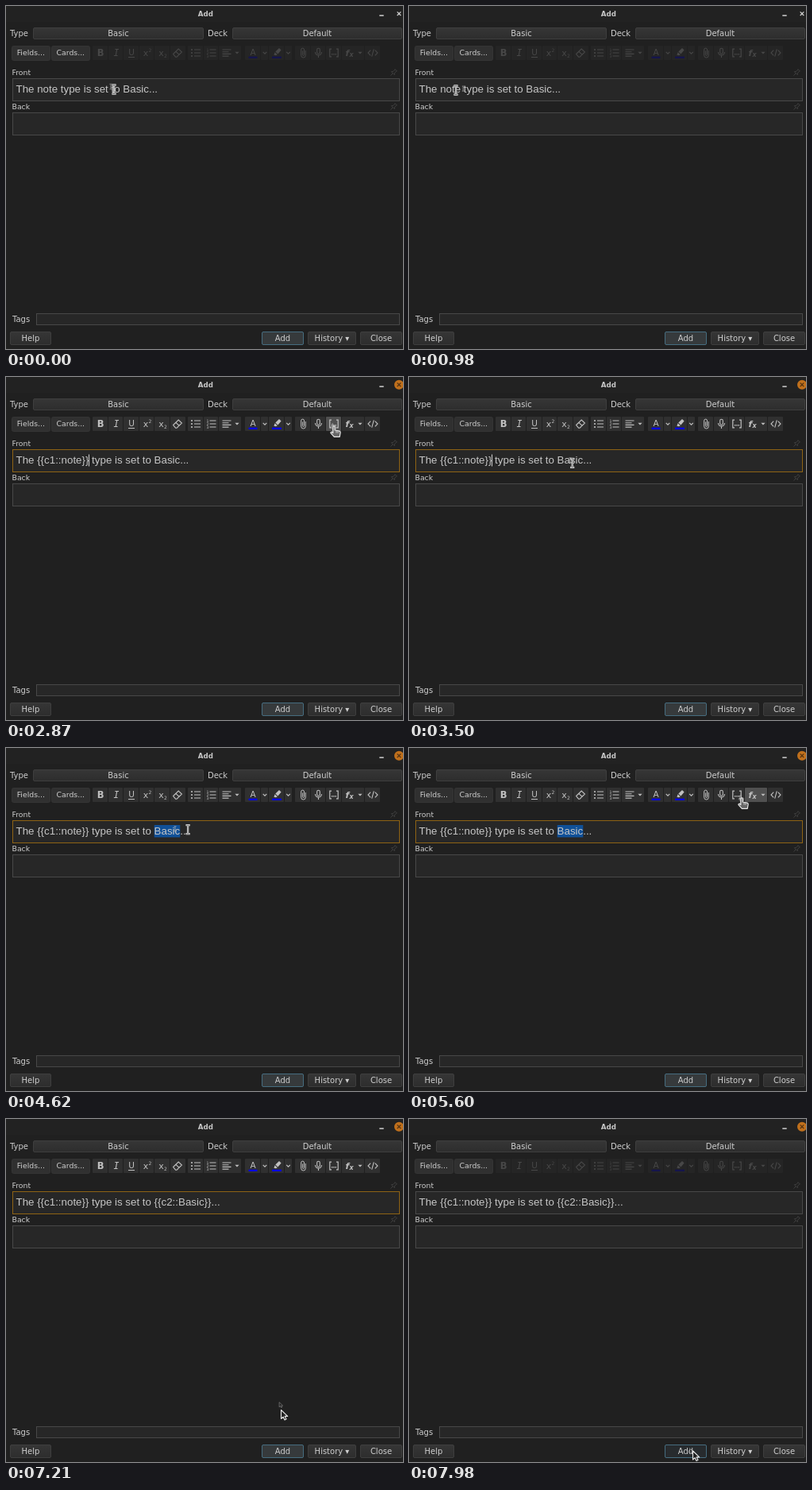
Animation, 500 px wide and 432 px high, one loop 8000 ms. Source, as an HTML page:

```html
<!DOCTYPE html>
<html lang="en">
<head>
<meta charset="utf-8">
<title>Add</title>
<style>
html, body { margin: 0; width: 100%; height: 100%; overflow: hidden; background: #202020; }
svg { display: block; width: 500px; height: 432px; }
text { font-family: "DejaVu Sans", sans-serif; font-size: 10px; fill: #cecece; white-space: pre; }
.mid { text-anchor: middle; }
.title { font-weight: bold; font-size: 8.67px; fill: #c9c9c9; }
.small { font-size: 9.33px; }
.field { font-family: "Liberation Sans", Arial, sans-serif; font-size: 13.333px; fill: #c6c6c6; }
.box { fill: #272727; stroke: #484848; }
.btn { fill: url(#face); stroke: #3e3e3e; }
.tool { fill: #303030; stroke: #353535; }
#add { fill: #363a3c; stroke: #466d80; }
.icons { color: #474747; }
.icons.on { color: #c0c0c0; }
.icons text { fill: currentColor; }
.line { fill: none; stroke: currentColor; stroke-width: 1.2; }
.solid { fill: currentColor; }
.ink { fill: #15154c; }
.on .ink { fill: #0808e0; }
.face { fill: #252525; }
.on .face { fill: #303030; }
.on .face.hover { fill: #505050; }
.pin { fill: none; stroke: #414141; stroke-width: .9; }
</style>
</head>
<body>
<svg id="stage" viewBox="0 0 500 432" xmlns="http://www.w3.org/2000/svg"></svg>
<script>
const LOOP = 8000, STEP = 70;
const SIZE = 13.333, LEFT = 12.5, BLINK = 490;
const CLOZE1 = 2450, CLOZE2 = 5740, FOCUS = 1190, BLUR = 7770;
const stage = document.getElementById("stage");

const rect = (x, y, x2, y2, cls, more = "") =>
  `<rect x="${x + .5}" y="${y + .5}" width="${x2 - x - 1}" height="${y2 - y - 1}" class="${cls}" ${more}/>`;
const label = (x, y, s, cls = "") => `<text x="${x}" y="${y}" class="${cls}">${s}</text>`;
const button = (x, y, x2, y2, s, id = "") =>
  rect(x, y, x2, y2, "btn", `rx="1.5" id="${id}"`) + label((x + x2) / 2, (y + y2) / 2 + 3.6, s, "mid");
const at = (x, y, body) => `<g transform="translate(${x} ${y})">${body}</g>`;
const line = (d, w = 1.2) => `<path d="${d}" class="line" style="stroke-width:${w}"/>`;
const solid = d => `<path d="${d}" class="solid"/>`;
const letter = (s, style = "", x = 0, y = 4.2) =>
  `<text x="${x}" y="${y}" class="mid" style="font-size:11.5px;${style}">${s}</text>`;
const pin = y => at(488, y, `<path transform="rotate(45)" class="pin" d="M-2 -4.5H2M-1.3 -4.5V-1L-2.8 1H2.8L1.3 -1V-4.5M0 1V5"/>`);

const drop = solid("M-2.6 -1.3H2.6L0 1.4Z");
const chevron = line("M-2.3 -1.2L0 1.2L2.3 -1.2");
const rows = [-4, 0, 4];
const lines = line(rows.map(y => `M-2 ${y}H6`).join(""));
const script = y => letter("x", "font-size:11px", -1.5, 3.6) + letter("2", "font-size:6px", 4, y);

const icons = [
  [119, letter("B", "font-weight:bold")],
  [139, letter("I", "font-style:italic;font-family:'DejaVu Sans Mono',monospace")],
  [158, letter("U", "font-size:10.5px", 0, 3.4) + line("M-4 5.5H4", 1)],
  [177.5, script(-1.5)],
  [197, script(5.6)],
  [216, line("M-5.4 1.5L1.2 -5L5.4 -1L-1 5.2H-2.4ZM-2.2 -1.8L2 2.4", 1.1)],
  [239, lines + rows.map(y => `<circle cx="-5" cy="${y}" r="1.1" class="solid"/>`).join("")],
  [258.5, lines + rows.map((y, i) => letter(i + 1, "font-size:4.6px", -4.6, y + 1.7)).join("")],
  [278, line("M-5.5 -4H5.5M-5.5 -1.3H2.5M-5.5 1.4H5.5M-5.5 4.1H2.5", 1.1)],
  [291, drop],
  [311, letter("A", "font-size:10.5px", 0, 2.7) + `<rect x="-5.5" y="4.6" width="11" height="2.4" class="ink"/>`],
  [326, chevron],
  [341, solid("M-3.6 2.8L-2.4 -.8L.8 2.2L-1 3.2ZM-1.7 -1.5L3 -6L5.6 -3.5L1.4 1.4Z") + `<rect x="-6" y="4.6" width="12" height="2.4" class="ink"/>`],
  [355.5, chevron],
  [374.5, line("M2.8 -3V3.2A2.8 2.8 0 0 1 -2.8 3.2V-4A1.9 1.9 0 0 1 1 -4V2.6A.9 .9 0 0 1 -.9 2.6V-2.6", 1)],
  [393.5, line("M-1.8 -4A1.8 1.8 0 0 1 1.8 -4V-.6A1.8 1.8 0 0 1 -1.8 -.6ZM-4 -1A4 4 0 0 0 4 -1M0 3V6", 1.1)],
  [413, line("M-3 -4.8H-5.2V4.8H-3M3 -4.8H5.2V4.8H3") + solid("M-3 1h1.4v1.4h-1.4zM-.7 1h1.4v1.4h-1.4zM1.6 1h1.4v1.4h-1.4z")],
  [432, letter("f", "font-style:italic;font-weight:bold;font-size:11px", -2.2, 4) + letter("x", "font-style:italic;font-weight:bold;font-size:8px", 3, 4.6)],
  [446, drop],
  [462, line("M-2.8 -3.4L-6 0L-2.8 3.4M2.8 -3.4L6 0L2.8 3.4M1.3 -4.6L-1.3 4.6", 1.1)]
];
// edges of the buttons in each toolbar group
const groups = [
  [109, 129, 148, 168, 187, 207, 227], [229, 249, 268, 297],
  [301, 321, 331, 351, 361], [364, 384, 403, 423, 452, 472]
];
const faces = groups.flatMap(g => g.slice(1).map((b, i) => [g[i], b]));

const shapes = {
  arrow: `<path d="M0 0V11L2.6 8.7L4.5 12.6L6.5 11.6L4.7 7.9H8.2Z" fill="#222" stroke="#e8e8e8" stroke-width="1.1" stroke-linejoin="round"/>`,
  beam: `<path d="M-2.6 -5.5H2.6M0 -5.5V5.5M-2.6 5.5H2.6" fill="none" stroke="#e4e4e4" stroke-width="2.3"/>`
    + `<path d="M-2.2 -5.5H2.2M0 -5.5V5.5M-2.2 5.5H2.2" fill="none" stroke="#444" stroke-width=".6"/>`,
  hand: at(-5, 0, `<path d="M-1.2 8.5V1A1.2 1.2 0 0 1 1.2 1V5L7 6.2Q8.4 6.6 8.2 8L7.2 13.4H.3L-4 8.6Q-4.2 7 -2.6 7.2Z" fill="#666" stroke="#e8e8e8" stroke-width="1.2" stroke-linejoin="round"/>`
    + `<path d="M3 6V8.5M5 6.4V8.7" stroke="#e8e8e8" stroke-width=".8"/>`)
};
const pointer = id => `<g id="${id}">` +
  Object.entries(shapes).map(([k, s]) => `<g data-kind="${k}">${s}</g>`).join("") + `</g>`;

stage.innerHTML = `
<defs><linearGradient id="face" x2="0" y2="1"><stop stop-color="#363636"/><stop offset="1" stop-color="#2d2d2d"/></linearGradient></defs>
<rect width="500" height="432" fill="#202020"/><rect width="500" height="20" fill="#222"/>`
+ label(251.3, 12.8, "Add", "title mid")
+ `<path d="M470.3 12H475.7" stroke="#d0d0d0" stroke-width="1.5"/>
<circle id="close" cx="495" cy="9.7" r="6" fill="#c0701c"/>
<path id="cross" d="M492.7 7.4L497.3 12M497.3 7.4L492.7 12" stroke-width="1.3"/>`
+ label(5, 38, "Type") + button(34, 27, 249, 42, "Basic")
+ label(254, 38, "Deck") + button(285, 27, 499, 42, "Default")
+ `<g id="tools" class="icons">`
+ faces.map(([a, b]) => `<rect x="${a}" y="50" width="${b - a - 1}" height="18" rx="1" class="face"/>`).join("")
+ icons.map(([x, body]) => at(x, 59, body)).join("") + `</g>`
+ rect(7, 50, 56, 69, "tool", `rx="2"`) + label(31.3, 62.3, "Fields...", "small mid")
+ rect(57, 50, 106, 69, "tool", `rx="2"`) + label(81.3, 62.3, "Cards...", "small mid")
+ label(7.5, 86.5, "Front", "small") + pin(84)
+ rect(8, 91, 496, 120, "box", `id="front"`)
+ `<rect id="mark" y="97" height="15.5" fill="#0f5098"/>`
+ label(LEFT, 109.3, "", "field").replace("<text", `<text id="words"`)
+ `<rect id="caret" y="97.5" width="1" height="15" fill="#d0d0d0"/>`
+ label(7.5, 129.5, "Back", "small") + pin(127)
+ rect(8, 134, 496, 163, "box")
+ label(8, 398, "Tags") + rect(38, 387, 496, 402, "box")
+ button(5, 410, 57, 427, "Help") + button(322, 410, 375, 427, "Add", "add")
+ button(380, 410, 441, 427, "History ▾") + button(446, 410, 499, 427, "Close")
+ pointer("ghost") + pointer("mouse");

const el = id => document.getElementById(id);
const set = (id, attrs) => { for (const k in attrs) el(id).setAttribute(k, attrs[k]); };
const show = (id, on) => { el(id).style.display = on ? "" : "none"; };
const faceEls = [...document.querySelectorAll(".face")];

// time, x, y of the pointer's hot spot
const path = [
  [0, 136, 105], [280, 240, 112], [490, 330, 70], [630, 280, 112], [840, 90, 110],
  [980, 59, 106], [1120, 54, 106], [1400, 54, 106], [2030, 397, 92], [2100, 404.5, 86],
  [2310, 418, 62], [2870, 418, 62], [3080, 395, 76], [3220, 395, 76], [3430, 207, 108.5],
  [3640, 203, 108], [4410, 203, 108], [5390, 424, 63], [6510, 424, 63],
  [7210, 346.5, 366.5], [7490, 355, 413], [7700, 355, 413], [7840, 357.5, 418], [LOOP, 357.5, 418]
];
function place(t) {
  t = Math.max(0, t);
  const i = Math.max(1, path.findIndex(p => p[0] >= t));
  const [a, x, y] = path[i - 1], [b, x2, y2] = path[i];
  let k = (t - a) / (b - a);
  if (b - a > 300) k = k * k * (3 - 2 * k);
  return [x + (x2 - x) * k, y + (y2 - y) * k];
}
const overTools = (x, y) => y > 50 && y < 69 && x < 472;
function kindAt([x, y]) {
  if (y > 91 && y < 120) return "beam";
  return overTools(x, y) ? "hand" : "arrow";
}
function putPointer(id, [x, y], kind, scale) {
  set(id, { transform: `translate(${x} ${y}) scale(${scale})` });
  for (const g of el(id).children) g.style.display = g.dataset.kind === kind ? "" : "none";
}

const pen = document.createElement("canvas").getContext("2d");
function widthOf(s) {
  pen.font = `100px "Liberation Sans", Arial, sans-serif`;
  return pen.measureText(s).width * SIZE / 100;
}

function draw(time) {
  const t = Math.floor(time % LOOP / STEP) * STEP;
  const one = t >= CLOZE1 ? "{{c1::note}}" : "note";
  const two = t >= CLOZE2 ? "{{c2::Basic}}" : "Basic";
  const lead = `The ${one} type is set to `;
  el("words").textContent = lead + two + "...";

  let from = "", picked = "";
  if (t >= 1260 && t < CLOZE1) [from, picked] = ["The ", "note"];
  if (t >= 3850 && t < CLOZE2) [from, picked] = [lead, "Basic"];
  set("mark", { x: LEFT + widthOf(from), width: widthOf(picked) });

  const focus = t >= FOCUS && t < BLUR;
  const since = t - (t >= CLOZE2 ? CLOZE2 : CLOZE1);
  show("caret", focus && since >= 0 && !picked && Math.floor(since / BLINK) % 2 === 0);
  set("caret", { x: Math.floor(LEFT + widthOf(t >= CLOZE2 ? lead + two : "The " + one)) });

  el("front").style.stroke = focus ? "#8e6314" : "";
  el("add").style.fill = t >= BLUR ? "#272b2e" : "";
  el("tools").classList.toggle("on", focus);
  show("close", t >= FOCUS);
  set("cross", { stroke: t >= FOCUS ? "#553413" : "#d0d0d0" });

  const p = place(t), late = place(t - 60), kind = kindAt(p);
  faceEls.forEach((f, i) => {
    const [a, b] = faces[i];
    f.classList.toggle("hover", overTools(...p) && p[0] >= a && p[0] < b);
  });
  putPointer("mouse", p, kind, 1);
  putPointer("ghost", [late[0] - 4, late[1] - 3.5], kind, .55);
  el("ghost").style.opacity = .55;
}

function tick() {
  draw(performance.now());
  requestAnimationFrame(tick);
}
tick();
</script>
</body>
</html>
```
